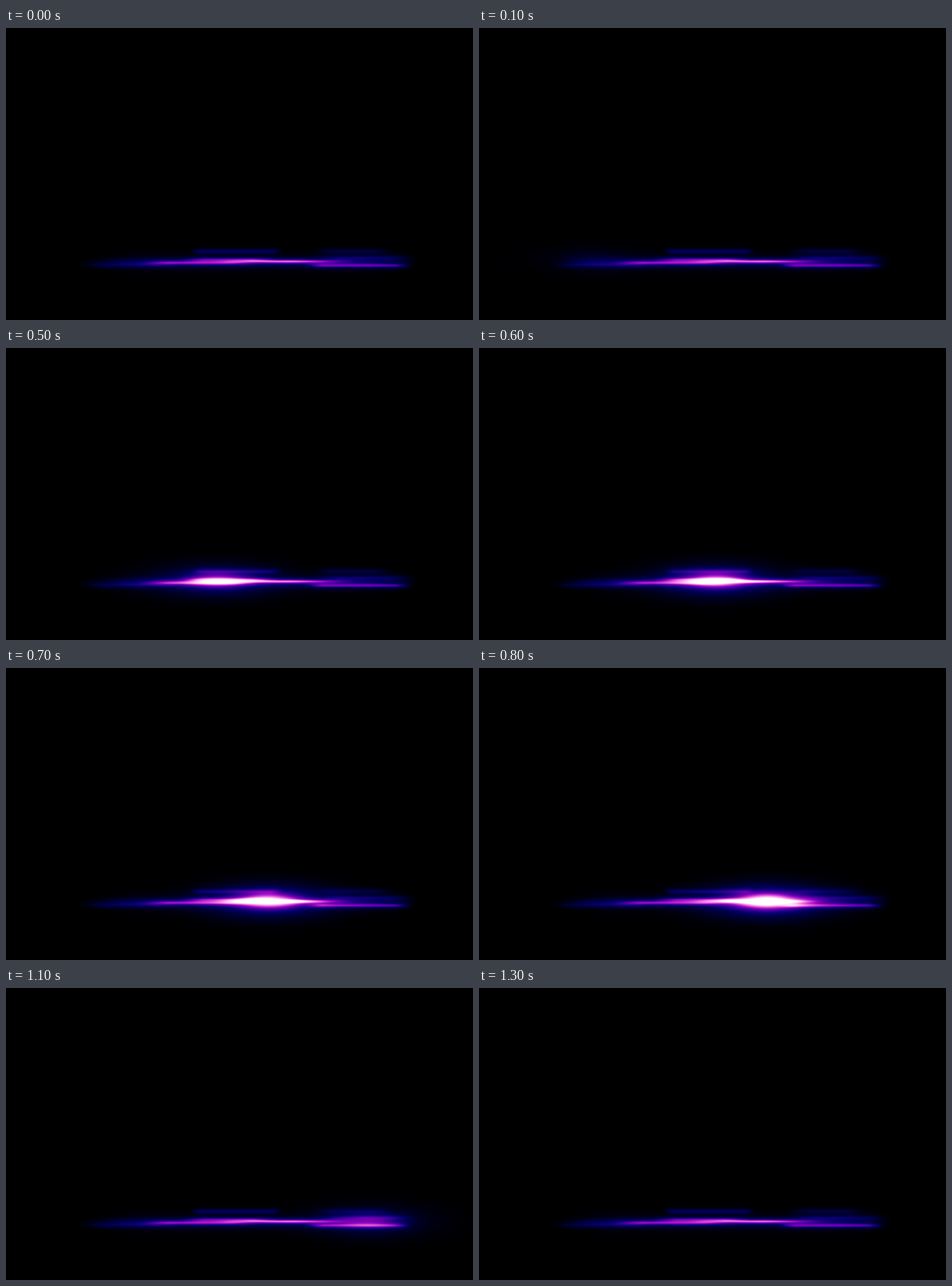
Write an HTML page with a canvas that moves like this. It is 500 px wide and 313 px high and loops after 1400 ms.

```html
<!DOCTYPE html>
<html lang="en">
<head>
<meta charset="utf-8">
<title>Light streak</title>
<style>
  html, body { margin: 0; width: 100%; height: 100%; overflow: hidden; background: #000; }
  canvas { display: block; width: 500px; height: 313px; }
</style>
</head>
<body>
<canvas id="stage" width="500" height="313"></canvas>
<script>
const W = 500, TOP = 206, H = 90, STEP = 100, STEPS = 14;
const ctx = document.getElementById('stage').getContext('2d');
const img = ctx.createImageData(W, H);
const base = new Float32Array(W * H);

const clamp = v => Math.min(1, Math.max(0, v));
const smooth = v => { v = clamp(v); return v * v * (3 - 2 * v); };
const bell = (d, s) => Math.exp(-(d * d) / (s * s));

// Soft horizontal line with a faint halo, fading out at both ends
function streak(left, right, y, size, power, fade = 0.3) {
  const len = (right - left) * fade;
  for (let j = 0; j < H; j++) {
    const d = j + TOP - y;
    const v = power * (bell(d, size) + 0.25 * bell(d, size * 2.2));
    for (let x = left; x < right; x++) {
      base[j * W + x] += v * smooth((x - left) / len) * smooth((right - x) / len);
    }
  }
}

// Blue haze and side bands
streak(78, 448, 251, 4.6, 0.14, 0.2);
streak(72, 190, 253.5, 2, 0.09);
streak(194, 298, 239, 2.2, 0.14, 0.15);
streak(324, 418, 239, 2.2, 0.09);
streak(325, 444, 246, 2.4, 0.12);

// Bright ridge
streak(136, 276, 251.2, 1.9, 0.28);
streak(180, 296, 248, 1.9, 0.25);
streak(214, 388, 249.7, 1.7, 0.45, 0.5);
streak(316, 438, 254.1, 1.9, 0.28, 0.2);

// Black through blue and magenta to white
function colour(v, out, p) {
  out[p] = 255 * smooth((v - 0.14) / 0.7);
  out[p + 1] = 255 * smooth((v - 0.45) / 0.6);
  out[p + 2] = 255 * clamp(1.12 * (1 - Math.exp(-2.1 * v)));
  out[p + 3] = 255;
}

// The light swells along the way, then dies quickly
const strength = k => k <= 9 ? (k / 9) ** 1.3 : ((13 - k) / 4) ** 2;

function draw(k) {
  const cx = 88 + 27.5 * k, cy = 247.5 + 0.22 * k, a = strength(k);
  for (let j = 0, p = 0; j < H; j++) {
    for (let x = 0; x < W; x++, p++) {
      const r = Math.hypot((x - cx) / 3.7, j + TOP - cy);
      const glow = a * (0.72 * bell(r, 8.2) + 0.4 * bell(r, 16.5));
      colour(base[p] + glow, img.data, p * 4);
    }
  }
  ctx.putImageData(img, 0, TOP);
}

const start = performance.now();
let last = -1;
function tick() {
  const k = Math.floor((performance.now() - start) / STEP) % STEPS;
  if (k !== last) draw(last = k);
  requestAnimationFrame(tick);
}
tick();
</script>
</body>
</html>
```
